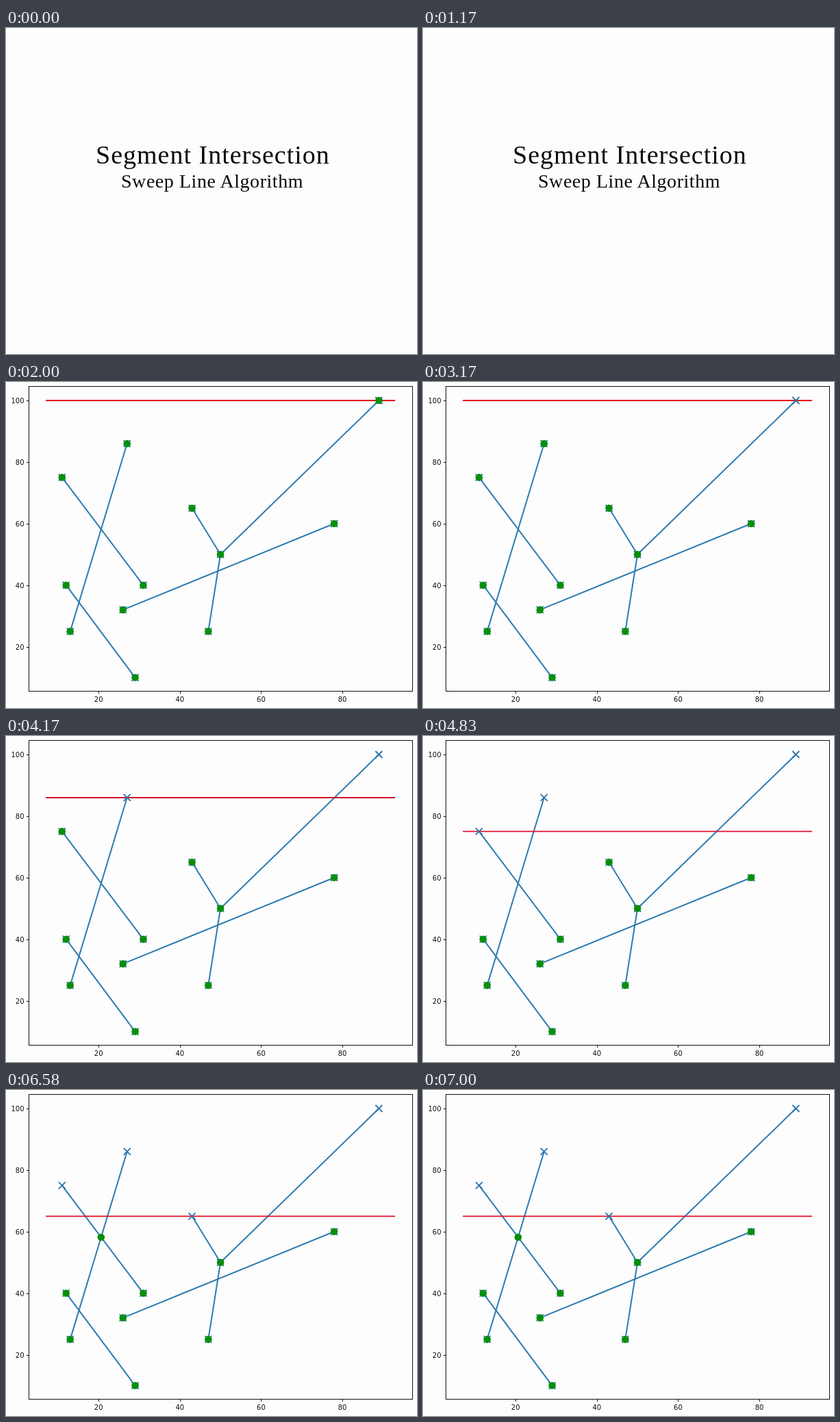
These frames come from a looping animation (600 by 476 pixels, 8 s). An HTML page:

```html
<!DOCTYPE html>
<html lang="en">
<head>
<meta charset="utf-8">
<title>Segment Intersection</title>
<style>
  html, body { margin: 0; width: 100%; height: 100%; overflow: hidden; background: #fefdfe; }
  svg { display: block; width: 600px; height: 476px; }
  #title text { font-family: "Liberation Serif", "Times New Roman", serif; text-anchor: start; fill: #0a0a0a; }
  #plot text { font: 10px "DejaVu Sans", sans-serif; fill: #111; }
  .axis { stroke: #111; stroke-width: 1; fill: none; }
  .seg { stroke: #2c7bb0; stroke-width: 2; fill: none; }
  .cross { stroke: #2c72a8; stroke-width: 1.8; fill: none; }
  .dot { fill: #078f0b; }
  #sweep { stroke-width: 1.9; }
</style>
</head>
<body>
<svg viewBox="0 0 600 476">
  <g id="title">
    <text x="131" y="198" font-size="38" letter-spacing="1">Segment Intersection</text>
    <text x="168" y="233" font-size="28" letter-spacing=".55">Sweep Line Algorithm</text>
  </g>
  <g id="plot"></g>
</svg>
<script>
const LOOP = 8000;
const PLOT_AT = 1580;
const FOUND_AT = 5580;

const segments = [
  [27, 86, 13, 25], [11, 75, 31, 40], [12, 40, 29, 10],
  [43, 65, 50, 50], [89, 100, 50, 50], [50, 50, 47, 25], [78, 60, 26, 32]
];

// When the sweep line reaches a height, and when the point there is handled
const stops = [
  { y: 100, at: 1580, done: 2580, color: '#e60a14' },
  { y: 86, at: 3580, done: 3580, color: '#cf1028' },
  { y: 75, at: 4580, done: 4580, color: '#dc1430' },
  { y: 65, at: 6580, done: 6580, color: '#dc1024' }
];

const px = x => 135.2 + (x - 20) * 5.93;
const py = y => 27 + (100 - y) * 4.495;
const plot = document.getElementById('plot');
const title = document.getElementById('title');

function add(name, attrs, text) {
  const node = document.createElementNS('http://www.w3.org/2000/svg', name);
  for (const key in attrs) node.setAttribute(key, attrs[key]);
  if (text !== undefined) node.textContent = text;
  plot.appendChild(node);
  return node;
}

const dot = (x, y) => add('circle', { class: 'dot', cx: px(x), cy: py(y), r: 5.3 });

function cross(x, y) {
  const r = 5;
  add('path', {
    class: 'cross',
    d: `M${px(x) - r} ${py(y) - r}l${2 * r} ${2 * r}m0 ${-2 * r}l${-2 * r} ${2 * r}`
  });
}

function meet([ax, ay, bx, by], [cx, cy, dx, dy]) {
  const ux = bx - ax, uy = by - ay, vx = dx - cx, vy = dy - cy;
  const k = ((cx - ax) * vy - (cy - ay) * vx) / (ux * vy - uy * vx);
  return [ax + k * ux, ay + k * uy];
}

for (const [a, b, c, d] of segments)
  add('line', { class: 'seg', x1: px(a), y1: py(b), x2: px(c), y2: py(d) });

const sweep = add('line', { id: 'sweep', x1: px(7), x2: px(93) });

const points = new Map();
for (const [a, b, c, d] of segments) {
  points.set(a + ',' + b, [a, b]);
  points.set(c + ',' + d, [c, d]);
}
for (const p of points.values()) cross(...p);
const dots = [...points.values()].map(([x, y]) => {
  const stop = stops.find(s => s.y === y);
  return { node: dot(x, y), until: stop ? stop.done : LOOP };
});
const found = dot(...meet(segments[0], segments[1]));

add('rect', { class: 'axis', x: 33.5, y: 6.5, width: 560, height: 445 });
for (let v = 20; v <= 100; v += 20) {
  const y = Math.round(py(v)) + .5;
  add('path', { class: 'axis', d: `M30 ${y}h3.5` });
  add('text', { x: 26.5, y: py(v) + 4, 'text-anchor': 'end' }, v);
  if (v === 100) continue;
  const x = Math.round(px(v)) + .5;
  add('path', { class: 'axis', d: `M${x} 451.5v3.5` });
  add('text', { x: px(v), y: 467, 'text-anchor': 'middle' }, v);
}

const show = (node, on) => node.setAttribute('visibility', on ? 'inherit' : 'hidden');

function draw(t) {
  show(title, t < PLOT_AT);
  show(plot, t >= PLOT_AT);
  const stop = stops.filter(s => s.at <= t).pop() || stops[0];
  sweep.setAttribute('y1', py(stop.y));
  sweep.setAttribute('y2', py(stop.y));
  sweep.setAttribute('stroke', stop.color);
  for (const d of dots) show(d.node, t < d.until);
  show(found, t >= FOUND_AT);
}

const start = performance.now();
function tick() {
  draw((performance.now() - start) % LOOP);
  requestAnimationFrame(tick);
}
tick();
</script>
</body>
</html>
```
